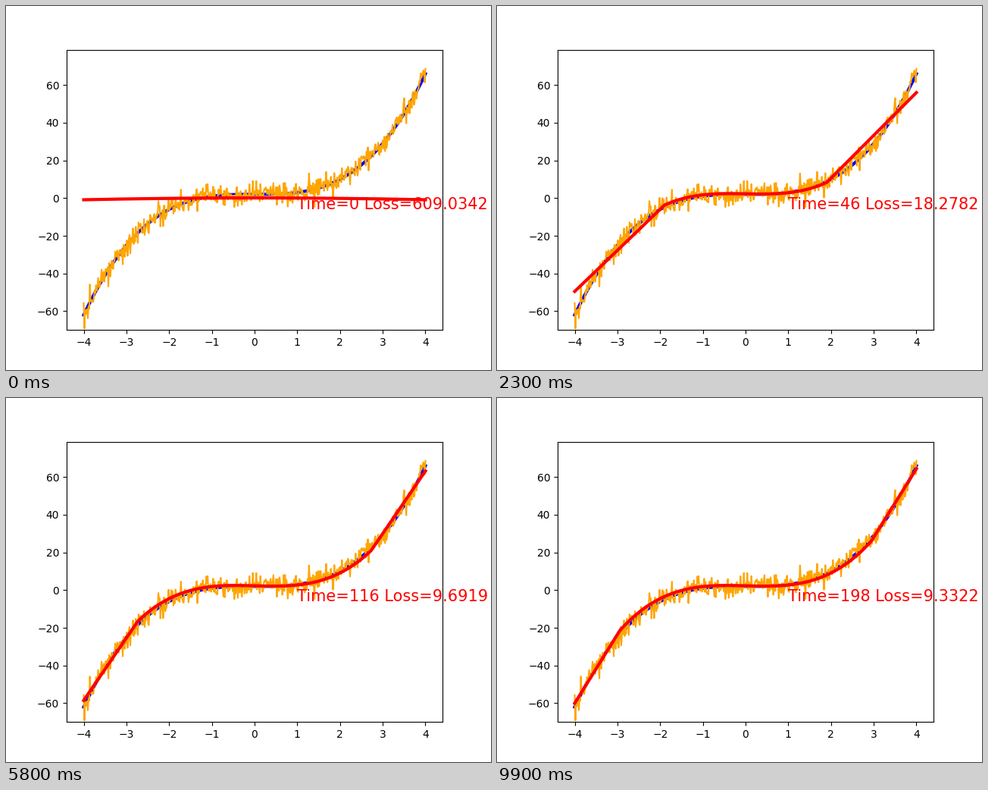
These frames come from a looping animation (640 by 480 pixels, 10 s). A matplotlib script:

```python
import numpy as np
import matplotlib.pyplot as plt
from matplotlib.animation import FuncAnimation

FRAMES, INTERVAL, STEP = 100, 100, 2
RISE = 16       # steps until the fit has tilted up to the data
BASE = 2.3      # height of the fit at x = 0

# Noisy cubic samples
rng = np.random.default_rng(3)
x = np.linspace(-4, 4, 500)
truth = x**3 + 2
noisy = truth + np.clip(rng.normal(0, 3.1, x.size), -9.5, 9.5)

# Heights of the two ends of the fit: they overshoot, then settle
end_steps = [16, 23, 32, 46, 72, 116, 198]
left_ends = [-38, -50, -59.7, -49.5, -55.2, -58.5, -60]
right_ends = [50.7, 58, 54.5, 56, 61.3, 63.2, 64.4]

# The loss falls exponentially between these readings
loss_steps = [0, 16, 46, 72, 116, 146, 198]
losses = np.array([609.0342, 84.0279, 18.2782, 11.7156,
                   9.6919, 9.4333, 9.3322])
FLOOR = 9.28


def loss_at(t):
    return FLOOR + np.exp(np.interp(t, loss_steps, np.log(losses - FLOOR)))


def bent(t):
    """Cubic middle with straight tails; the knees move outwards."""
    age = t - RISE
    knee = 3 - 2 * np.exp(-age / 50)
    tilt = 7 * np.exp(-age / 8) - 0.6
    inner = np.clip(x, -knee, knee)
    mid = inner**3 + tilt * inner + BASE
    ends = np.where(x < 0, np.interp(t, end_steps, left_ends),
                    np.interp(t, end_steps, right_ends))
    tail = np.abs(x - inner) / (4 - knee)
    return mid + tail * (ends - mid)


def fit_at(t):
    start = 0.1 - 0.06 * x**2
    gain = min(t / RISE, 1)**1.5
    return start + gain * (bent(max(t, RISE)) - start)


fig, ax = plt.subplots(figsize=(6.4, 4.8), dpi=100)
ax.plot(x, truth, color="blue", lw=3)
ax.plot(x, noisy, color="orange", lw=1.5)
fit, = ax.plot(x, fit_at(0), color="red", lw=3)
label = ax.text(1, -6, "", size=15, color="red")
ax.set_xlim(-4.4, 4.4)
ax.set_ylim(-69.95, 78.76)


def update(frame):
    t = frame * STEP
    fit.set_ydata(fit_at(t))
    label.set_text(f"Time={t} Loss={loss_at(t):.4f}")
    return fit, label


anim = FuncAnimation(fig, update, frames=FRAMES, interval=INTERVAL,
                     repeat=True, repeat_delay=0)
plt.show()
```
